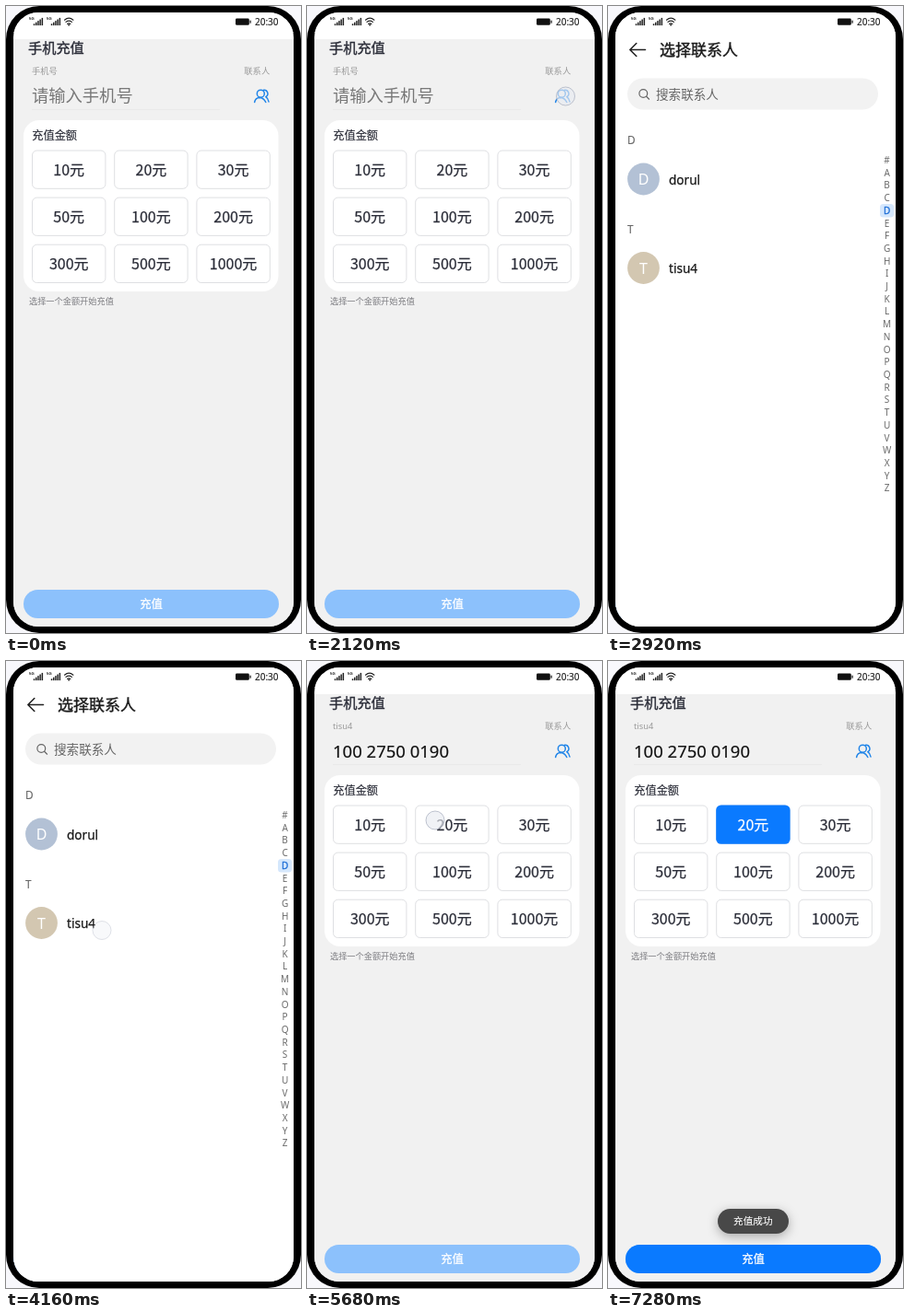
An HTML page for the animation above (8080 ms loop, 320x681 px).

```html
<!DOCTYPE html>
<html lang="zh-CN">
<head>
<meta charset="utf-8">
<title>手机充值</title>
<style>
  html, body { margin: 0; width: 100%; height: 100%; overflow: hidden; background: #f8f8fc; }
  svg { display: block; width: 100vw; height: 100vh; }
  text { font-family: "Noto Sans CJK SC", "Noto Sans CJK", sans-serif; white-space: pre; }
  .latin { font-family: "Noto Sans", sans-serif; }
  #toast rect { filter: drop-shadow(0 3px 6px rgba(0, 0, 0, .3)); }
</style>
</head>
<body>
<svg id="stage" viewBox="0 0 320 681" preserveAspectRatio="none">
  <clipPath id="screen"><rect x="8" y="7" width="304" height="667" rx="27"/></clipPath>
  <rect width="320" height="681" rx="36"/>
  <g clip-path="url(#screen)">
    <rect x="8" y="7" width="304" height="667" fill="#fff"/>
    <g id="main"></g>
    <g id="contacts"></g>
    <rect x="8" y="7" width="304" height="22" fill="#fff"/>
    <g id="status"></g>
    <g id="touches"></g>
  </g>
</svg>
<script>
const LOOP = 8080, STEP = 40, WIDTH = 304;
const INK = '#2b2d38', BLUE = '#0a7aff';
const person = { name: 'tisu4', phone: '100 2750 0190' };
const byId = id => document.getElementById(id);

function add(parent, tag, attrs, content = '') {
  const node = document.createElementNS('http://www.w3.org/2000/svg', tag);
  for (const key in attrs) node.setAttribute(key, attrs[key]);
  node.textContent = content;
  return parent.appendChild(node);
}
const box = (parent, x, y, width, height, rx, fill, more = {}) =>
  add(parent, 'rect', { x, y, width, height, rx, fill, ...more });
const circle = (parent, cx, cy, r, fill, more = {}) =>
  add(parent, 'circle', { cx, cy, r, fill, ...more });
const line = (parent, d, stroke, width = 1) =>
  add(parent, 'path', { d, stroke, 'stroke-width': width, fill: 'none',
    'stroke-linecap': 'round', 'stroke-linejoin': 'round' });

// Places text by its vertical centre; weight is a thin outline that thickens the glyphs.
function label(parent, content, x, cy, size, fill, weight = 0, more = {}) {
  return add(parent, 'text', { x, y: cy + size * 0.375, 'font-size': size, fill,
    stroke: fill, 'stroke-width': weight, ...more }, content);
}
const centred = { 'text-anchor': 'middle' };
const latin = { class: 'latin' };

function buildStatus(g) {
  for (const x of [25, 44]) {
    label(g, '5G', x, 13.8, 4.2, '#222', 0.15, latin);
    for (let i = 0; i < 5; i++) box(g, x + 4.8 + i * 2.2, 19.3 - i * 1.6, 1.5, 1.8 + i * 1.6, 0, '#222');
  }
  line(g, 'M63.5 15.2Q68.2 11.2 72.9 15.2M65 17.4Q68.2 14.8 71.4 17.4M66.6 19.4Q68.2 18.2 69.8 19.4', '#222', 1.2);
  circle(g, 68.2, 20.7, 0.9, '#222');
  box(g, 249, 13.6, 14.8, 7.2, 1.4, '#111');
  box(g, 264.5, 15.6, 1.2, 3.2, 0.5, '#111');
  label(g, '20:30', 270, 17, 10, '#222', 0.15, latin);
}

function buildMain(g) {
  box(g, 8, 36, WIDTH, 640, 0, '#f1f1f1');
  label(g, '手机充值', 24, 45, 15.2, INK, 0.35);
  const empty = add(g, 'g'), filled = add(g, 'g');
  label(empty, '手机号', 28, 71, 9.3, '#9a9a9a');
  label(empty, '请输入手机号', 28, 97.5, 18.3, '#777');
  label(filled, person.name, 28, 71, 9.3, '#9a9a9a', 0, latin);
  label(filled, person.phone, 28, 98, 18.5, '#111', 0.15, latin);
  label(g, '联系人', 258.3, 71, 9.3, '#9a9a9a');
  box(g, 28, 112, 204, 0.8, 0, '#e8e8e8');
  circle(g, 276.3, 95.2, 4, 'none', { stroke: '#2185e8', 'stroke-width': 1.5 });
  line(g, 'M269.6 104.5Q270.5 99.8 275 99.6Q279.2 99.6 281.8 104.5M279.5 91.2A4 4 0 0 1 281.8 98.7Q284.4 100.4 285 104', '#2185e8', 1.5);

  box(g, 19, 124, 276.5, 186, 17, '#fff');
  label(g, '充值金额', 28.3, 140.3, 12.2, INK, 0.2);
  const amounts = [10, 20, 30, 50, 100, 200, 300, 500, 1000];
  let selected;
  amounts.forEach((amount, i) => {
    const x = 28.5 + (i % 3) * 89.2, y = 157 + Math.floor(i / 3) * 51.1;
    const text = (parent, fill) =>
      label(parent, amount + '元', x + 39.7, y + 20.7, 16, fill, 0.25, centred);
    box(g, x, y, 79.4, 41.3, 5, '#fff', { stroke: '#dedfe2' });
    text(g, INK);
    if (amount === 20) {
      selected = add(g, 'g');
      box(selected, x - 0.5, y - 0.5, 80.4, 42.3, 5.5, BLUE);
      text(selected, '#fff');
    }
  });
  label(g, '选择一个金额开始充值', 25, 321, 9.2, '#7c7c80');

  box(g, 19, 634, 277, 31, 15.5, '#8cc1fc');
  const active = box(g, 19, 634, 277, 31, 15.5, BLUE);
  const pressed = box(g, 19, 634, 277, 31, 15.5, '#000');
  label(g, '充值', 157.5, 649.5, 12.3, '#fff', 0.3, centred);
  const toast = add(g, 'g', { id: 'toast' });
  box(toast, 119, 595, 77, 27, 13.5, '#484848');
  label(toast, '充值成功', 157.3, 608.3, 10.6, '#fff', 0.1, centred);
  return { empty, filled, selected, active, pressed, toast };
}

function buildContacts(g) {
  box(g, 8, 7, WIDTH, 667, 0, '#fff');
  line(g, 'M40.5 47.5H24M30.8 40.5L23.8 47.5L30.8 54.5', '#222', 1.5);
  label(g, '选择联系人', 56, 48, 17, '#1c1c1c', 0.4);
  box(g, 21, 78.5, 272, 34, 17, '#f2f2f2');
  circle(g, 38.3, 95, 4.4, 'none', { stroke: '#666', 'stroke-width': 1.2 });
  line(g, 'M41.6 98.3L44.6 101.2', '#666', 1.2);
  label(g, '搜索联系人', 52, 95.8, 13.6, '#666');
  const entry = (letter, name, y, color) => {
    label(g, letter, 21, y - 42, 11.8, '#666', 0.1, latin);
    circle(g, 38.5, y, 17.4, color);
    label(g, letter, 38.5, y, 16, '#fff', 0, { ...latin, ...centred });
    label(g, name, 66, y + 0.5, 13.6, '#181818', 0.25, latin);
  };
  entry('D', 'dorul', 188, '#b3c1d5');
  entry('T', person.name, 284.5, '#d3c7b1');
  box(g, 295, 215, 15, 14.5, 3.5, '#d5e7fc');
  [...'#ABCDEFGHIJKLMNOPQRSTUVWXYZ'].forEach((letter, i) => {
    const current = letter === 'D';
    label(g, letter, 302.6, 167.2 + i * 13.71, 10, current ? '#1f6fd6' : '#6a6a6a',
      current ? 0.35 : 0, { ...latin, ...centred });
  });
}

const touches = [
  { x: 280.5, y: 98, start: 2120, hold: 2200, end: 2280 },
  { x: 104, y: 292.5, start: 4040, hold: 4080, end: 4240 },
  { x: 139, y: 173, start: 5680, hold: 5800, end: 5880 },
  { x: 158, y: 649, start: 6680, hold: 6720, end: 6840 },
];
for (const touch of touches) {
  touch.node = circle(byId('touches'), touch.x, touch.y, 10, '#e9ebf1',
    { 'fill-opacity': 0.65, stroke: '#aeb4c4', 'stroke-opacity': 0.8 });
}

buildStatus(byId('status'));
const view = buildMain(byId('main'));
buildContacts(byId('contacts'));

const PUSH = 2280, POP = 4200;
const ramp = (t, from, to) => Math.min(1, Math.max(0, (t - from) / (to - from)));
const settle = ms => ms <= 0 ? 0 : ms > 400 ? 1 : 1 - Math.exp(-0.019 * ms);
const fade = (node, value) => node.setAttribute('opacity', value);
const slide = (id, x) => byId(id).setAttribute('transform', `translate(${Math.round(x)})`);

function draw() {
  const t = Math.floor(performance.now() % LOOP / STEP) * STEP;
  const shown = settle(t - PUSH) - settle(t - POP);
  slide('main', -shown * WIDTH / 3);
  slide('contacts', (1 - shown) * WIDTH);
  fade(view.empty, t < POP ? 1 : 0);
  fade(view.filled, t < POP ? 0 : 1);
  fade(view.selected, ramp(t, 5800, 5920));
  fade(view.active, ramp(t, 5800, 5920));
  fade(view.pressed, t >= 6680 && t < 6800 ? 0.1 : 0);
  fade(view.toast, ramp(t, 6720, 6880));
  for (const { node, start, hold, end } of touches)
    fade(node, t < start ? 0 : 1 - ramp(t, hold, end));
  requestAnimationFrame(draw);
}
draw();
</script>
</body>
</html>
```
